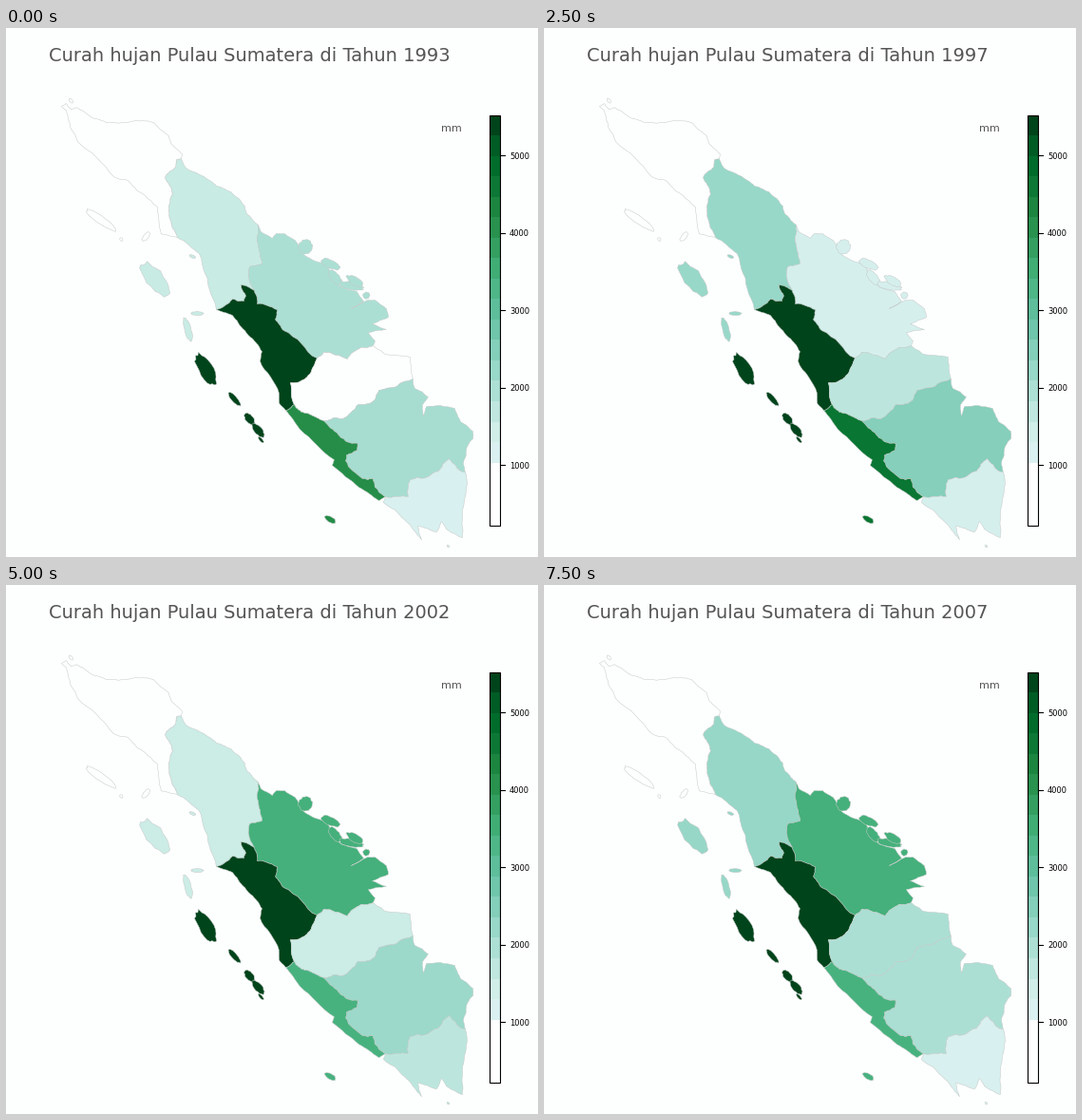
A matplotlib script for the animation above (8000 ms loop, 560x557 px).

```python
import numpy as np
import matplotlib.pyplot as plt
from matplotlib.animation import FuncAnimation
from matplotlib.patches import Polygon, Rectangle

W, H, DPI = 560, 557, 100
PAPER, EDGE, INK = "#fdfefe", "#c4cac8", "#555555"
CMAP = plt.get_cmap("BuGn")
rng = np.random.default_rng(7)


def arc(*xy, rough=0.1):
    """Line through a few x, y points, roughened by midpoint displacement."""
    pts = np.array(xy, float).reshape(-1, 2)
    for _ in range(3):
        step = np.diff(pts, axis=0)
        normal = np.column_stack([-step[:, 1], step[:, 0]])
        middle = pts[:-1] + step / 2 + normal * rng.uniform(-rough, rough, (len(step), 1))
        finer = np.empty((2 * len(pts) - 1, 2))
        finer[::2], finer[1::2] = pts, middle
        pts = finer
    return pts


def isle(x, y, length, width, tilt=50):
    """Rough ellipse; most islands lie along the axis of the mainland."""
    a = np.linspace(0, 2 * np.pi, 22, endpoint=False)
    r = rng.uniform(0.88, 1.1, a.size)
    u, v = r * np.cos(a) * length / 2, r * np.sin(a) * width / 2
    t = np.radians(tilt)
    return np.column_stack([x + u * np.cos(t) - v * np.sin(t),
                            y + u * np.sin(t) + v * np.cos(t)])


def ring(*arcs):
    return np.vstack(arcs)


# Coasts, north to south
aceh_north = arc(58, 82, 63, 79, 68, 85, 74, 83, 89, 93, 105, 99, 131, 98, 155, 99,
                 171, 113, 174, 122, 185, 132, 184, 137, rough=0.06)
aceh_west = arc(58, 82, 63, 86, 67, 103, 75, 119, 113, 156, 128, 160, 138, 171,
                152, 181, 159, 188, 163, 216, 180, 220, rough=0.06)
north_east = arc(184, 137, 187, 144, 214, 160, 230, 169, 251, 187, 254, 196, 265, 207)
north_west = arc(180, 220, 203, 237, 207, 252, 221, 296, rough=0.06)
riau_east = arc(265, 207, 268, 214, 280, 221, 284, 216, 293, 216, 304, 223, 313, 238,
                338, 250, 347, 267, 352, 272, 369, 277, 376, 287, 363, 295, 380, 286,
                388, 286, 400, 295, 402, 304, 385, 311, 400, 317, 381, 320, 388, 329,
                386, 334, rough=0.05)
west_coast = arc(221, 296, 238, 302, 247, 314, 263, 331, 269, 340, 267, 350,
                 287, 384, 287, 394, 294, 402, rough=0.06)
jambi_coast = arc(386, 334, 399, 343, 425, 346, 428, 369, rough=0.07)
south_coast = arc(428, 369, 430, 379, 444, 388, 438, 396, 439, 408, 442, 398,
                  472, 400, 478, 414, 491, 424, 491, 432, 485, 440, 481, 458, 483, 467,
                  rough=0.08)
bengkulu_coast = arc(294, 402, 309, 422, 345, 454, 343, 460, 371, 483, 392, 497,
                     399, 493, rough=0.04)
lampung_coast = arc(399, 493, 397, 499, 419, 517, 437, 538, 433, 524, 453, 530,
                    458, 519, 463, 527, 480, 536, 480, 510, 485, 480, 483, 467,
                    rough=0.06)

# Inland borders
aceh_north_b = arc(184, 137, 179, 138, 178, 146, 167, 157, 175, 174, 171, 187,
                   172, 200, 180, 220)
north_riau_b = arc(265, 207, 266, 234, 269, 248, 256, 251, 257, 269, 261, 276)
north_west_b = arc(221, 296, 238, 285, 250, 287, 252, 282, 247, 270, 261, 276)
west_riau_b = arc(261, 276, 264, 290, 285, 296, 283, 306, 292, 318, 327, 347)
riau_jambi_b = arc(386, 334, 373, 336, 359, 348, 334, 341, 327, 347)
west_jambi_b = arc(327, 347, 320, 363, 312, 370, 299, 373, 303, 396)
west_bengkulu_b = arc(303, 396, 294, 402)
jambi_bengkulu_b = arc(303, 396, 314, 405, 325, 409, 334, 413)
jambi_south_b = arc(428, 369, 392, 381, 388, 391, 370, 396, 354, 411, 334, 413)
bengkulu_south_b = arc(334, 413, 347, 425, 358, 435, 370, 437, 369, 444, 358, 449,
                       357, 455, 375, 474, 386, 474, 388, 483, 399, 493)
south_lampung_b = arc(483, 467, 478, 466, 466, 453, 455, 466, 425, 475, 423, 493,
                      399, 493)

PROVINCES = {
    "north": [
        ring(north_east, north_riau_b, north_west_b[::-1], north_west[::-1],
             aceh_north_b[::-1]),
        isle(157, 264, 44, 18), isle(191, 317, 26, 7, 75), isle(201, 300, 13, 4, 0),
        isle(196, 240, 7, 3, 20),
    ],
    "riau": [
        ring(riau_east, riau_jambi_b, west_riau_b[::-1], north_riau_b[::-1]),
        isle(315, 230, 15, 15), isle(341, 248, 21, 9, 25), isle(346, 262, 19, 9),
        isle(363, 271, 26, 8, 12), isle(367, 266, 20, 8, 30), isle(379, 281, 7, 7),
    ],
    "west": [
        ring(west_coast, west_bengkulu_b[::-1], west_jambi_b[::-1],
             west_riau_b[::-1], north_west_b[::-1]),
        isle(210, 359, 38, 15, 60), isle(240, 390, 18, 6), isle(256, 411, 14, 8),
        isle(265, 423, 18, 8), isle(268, 433, 8, 3),
    ],
    "jambi": [ring(jambi_coast, jambi_south_b, jambi_bengkulu_b[::-1],
                   west_jambi_b[::-1], riau_jambi_b[::-1])],
    "south": [ring(south_coast, south_lampung_b, bengkulu_south_b[::-1],
                   jambi_south_b[::-1])],
    "bengkulu": [
        ring(bengkulu_coast, bengkulu_south_b[::-1], jambi_bengkulu_b[::-1],
             west_bengkulu_b),
        isle(341, 517, 13, 6, 30),
    ],
    "lampung": [ring(lampung_coast, south_lampung_b), isle(465, 545, 3, 2)],
    "aceh": [
        ring(aceh_north, aceh_north_b, aceh_west[::-1]),
        isle(100, 202, 38, 8, 35), isle(68, 76, 6, 3), isle(147, 219, 12, 5, 130),
        isle(121, 222, 4, 3),
    ],
}

# Rainfall in key years, percent of the scale; the years between are interpolated
KEY_RAIN = {
    1993: (26, 33, 100, 0, 34, 74, 19, 0),
    1994: (19, 0, 100, 0, 0, 19, 19, 0),
    1996: (31, 31, 100, 31, 45, 100, 18, 0),
    1999: (51, 0, 100, 25, 37, 51, 25, 0),
    2002: (25, 61, 100, 25, 37, 60, 29, 0),
    2005: (0, 48, 31, 0, 25, 100, 34, 0),
    2007: (38, 61, 100, 33, 33, 60, 19, 0),
}


def rain(year):
    return [np.interp(year, list(KEY_RAIN), column) for column in zip(*KEY_RAIN.values())]


def shade(percent):
    return CMAP(percent / 100) if percent > 15 else PAPER


plt.rcParams["font.family"] = "DejaVu Sans"
fig = plt.figure(figsize=(W / DPI, H / DPI), dpi=DPI, facecolor=PAPER)
ax = fig.add_axes([0, 0, 1, 1])
# The offset makes whole coordinates snap to pixel centres
ax.set(xlim=(-.4, W - .4), ylim=(H - .6, -.6))
ax.axis("off")

shapes = {
    name: [ax.add_patch(Polygon(p, closed=True, ec=EDGE, lw=0.35)) for p in parts]
    for name, parts in PROVINCES.items()
}

# Colour scale
TOP, BOTTOM, LEFT, RIGHT = 91, 523, 509, 520
edges = np.linspace(TOP, 457, 18)
for i, (y0, y1) in enumerate(zip(edges, edges[1:])):
    level = 100 * (BOTTOM - (y0 + y1) / 2) / (BOTTOM - TOP) if i else 100
    ax.add_patch(Rectangle((LEFT, y0), RIGHT - LEFT, y1 - y0, fc=shade(level), lw=0))
ax.add_patch(Rectangle((LEFT, TOP), RIGHT - LEFT, BOTTOM - TOP, fill=False,
                       ec="black", lw=0.8))
for mm in range(1000, 6000, 1000):
    y = 459.8 - (mm - 1000) * 0.0815
    ax.plot([RIGHT, RIGHT + 4.9], [y, y], color="black", lw=0.8)
    ax.text(529.5, y, str(mm), fontsize=6, va="center_baseline")

title = ax.text(256, 34, "", fontsize=14, color=INK, ha="center", va="baseline")
ax.text(458, 108, "mm", fontsize=8, color=INK, va="baseline")


def draw(frame):
    year = 1992 + max(frame, 1)
    title.set_text(f"Curah hujan Pulau Sumatera di Tahun {year}")
    for patches, percent in zip(shapes.values(), rain(year)):
        for patch in patches:
            patch.set_facecolor(shade(percent))
    return []


anim = FuncAnimation(fig, draw, frames=16, interval=500, repeat=True, repeat_delay=0)
plt.show()
```
